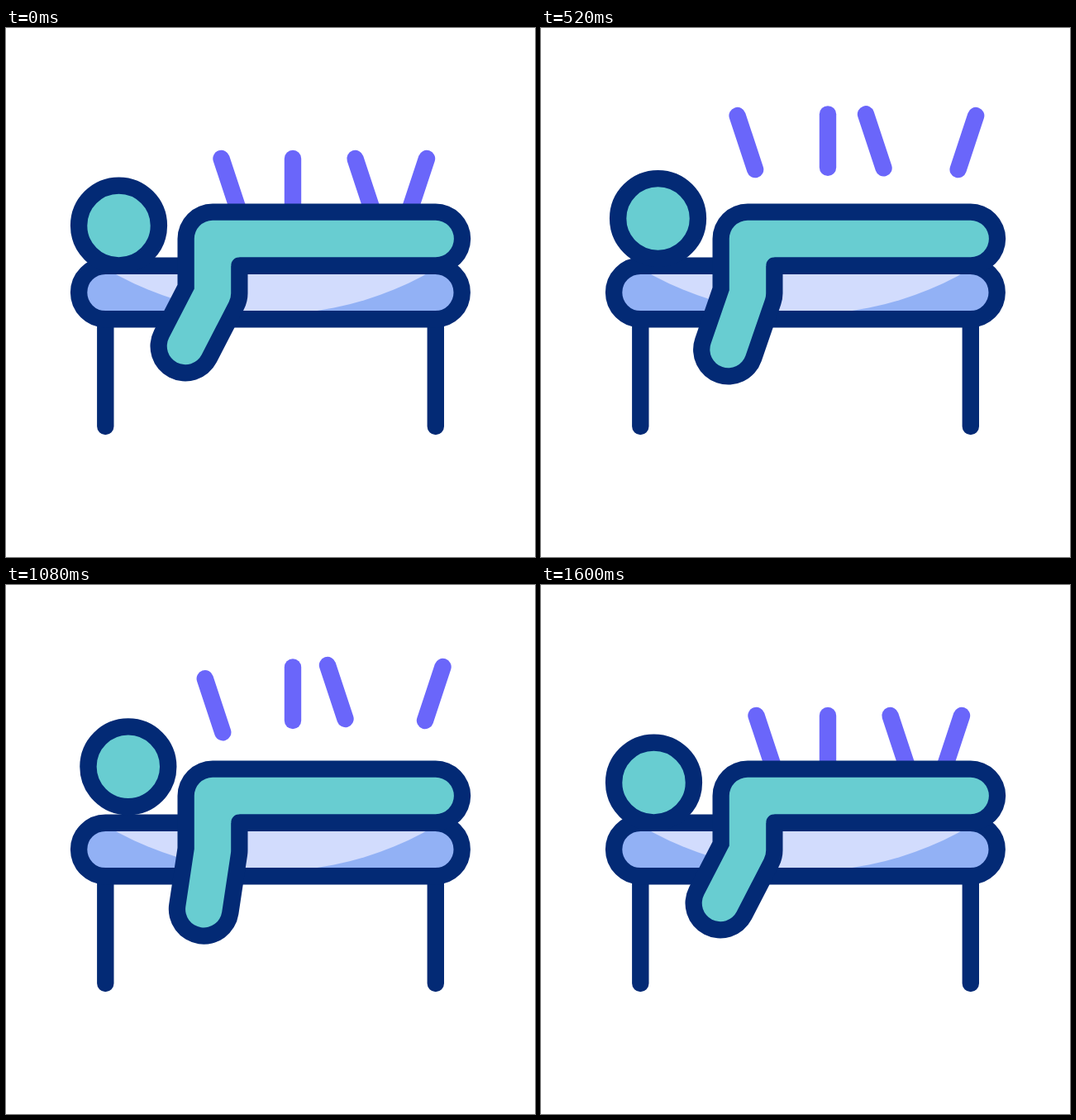
Animation, 640 px wide and 640 px high, one loop 1640 ms. Source, as an HTML page:

```html
<!DOCTYPE html>
<html lang="en">
<head>
<meta charset="utf-8">
<title>Acupuncture</title>
<style>
  html, body { margin: 0; height: 100%; overflow: hidden; background: #fff; }
  svg { display: block; width: 100vw; height: 100vh; }
  path, circle { stroke-linecap: round; stroke-linejoin: round; }
  .line { fill: none; stroke: #032a75; stroke-width: 20.4; }
  .needle { stroke: #6a66fa; stroke-width: 20.4; }
  .rim { fill: none; stroke: #032a75; stroke-width: 85; }
  .skin { fill: none; stroke: #68cdd1; stroke-width: 44.4; }
</style>
</head>
<body>
<svg viewBox="0 0 640 640">
  <clipPath id="bed"><rect x="88" y="288" width="464" height="64" rx="32"/></clipPath>
  <path class="needle" d="M0 0L21.5 65"/>
  <path class="needle" d="M0 0V64.5"/>
  <path class="needle" d="M0 0L21.5 65"/>
  <path class="needle" d="M0 0L-21.5 65"/>
  <path class="line" d="M120.3 352V482M519.8 352V482"/>
  <g clip-path="url(#bed)">
    <path fill="#92b1f5" d="M80 280H560V360H80Z"/>
    <circle cx="320.5" cy="-44" r="390" fill="#d2dcfd"/>
  </g>
  <rect class="line" x="88.1" y="287.7" width="463.6" height="64.6" rx="32.3"/>
  <circle id="head" r="48.4" fill="#68cdd1" stroke="#032a75" stroke-width="20.4"/>
  <path class="rim body"/>
  <path class="skin body"/>
  <path fill="#68cdd1" d="M271 288H272.2A10.2 10.2 0 0 1 282.4 277.2V276H271Z"/>
</svg>
<script>
const LOOP = 1640, STEP = 40;
const needles = document.querySelectorAll('.needle');
const bodies = document.querySelectorAll('.body');
const head = document.getElementById('head');

// Each needle: inserted position, pulled-out position, start of its return
const moves = [
  [260.5, 158, 234.5, 99, 965],
  [347, 158, 347, 97, 1036],
  [422.5, 158, 389, 97, 1121],
  [509, 158, 528.5, 99, 1190]
];

const mix = (a, b, k) => a + (b - a) * k;
function ease(t, from, to) {
  const x = Math.min(1, Math.max(0, (t - from) / (to - from)));
  return x * x * (3 - 2 * x);
}

function draw(t) {
  moves.forEach(([x0, y0, x1, y1, back], i) => {
    const out = ease(t, 136, 626) - ease(t, back, back + 360);
    needles[i].setAttribute('transform', `translate(${mix(x0, x1, out)} ${mix(y0, y1, out)})`);
  });

  const lift = ease(t, 284, 838) - ease(t, 958, 1522);
  head.setAttribute('cx', mix(136.5, 149.4, lift));
  head.setAttribute('cy', mix(239, 217.2, lift));

  const angle = mix(27.3, 6, lift) * Math.PI / 180;
  const handX = 250 - 72 * Math.sin(angle), handY = 321 + 72 * Math.cos(angle);
  for (const b of bodies) b.setAttribute('d', `M519.7 255H250V321L${handX} ${handY}`);
}

const start = performance.now();
function tick() {
  const t = (performance.now() - start) % LOOP;
  draw(Math.floor(t / STEP) * STEP);
  requestAnimationFrame(tick);
}
tick();
</script>
</body>
</html>
```
